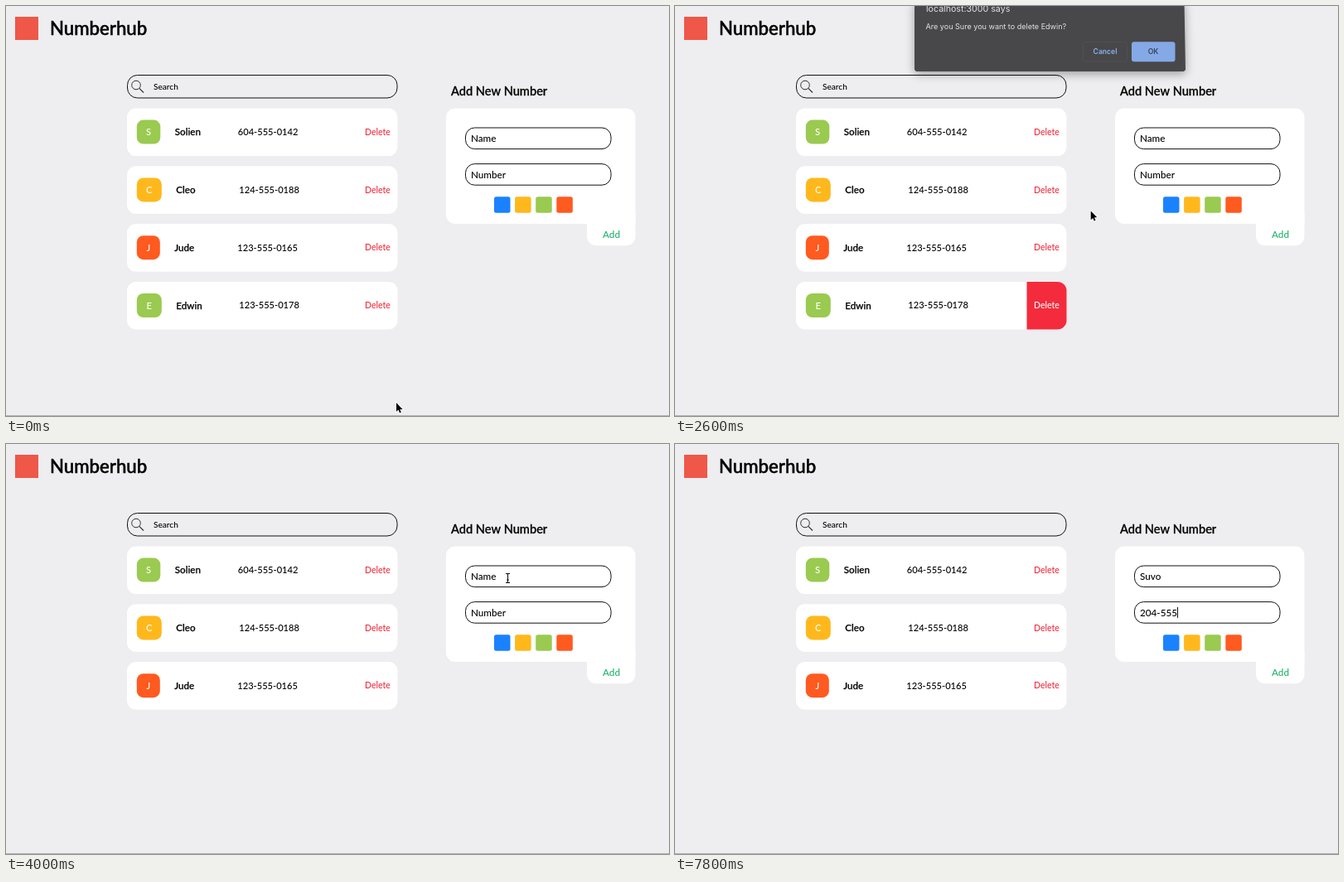
These frames come from a looping animation (800x495 px, 8000 ms). An HTML page with a canvas:

```html
<!DOCTYPE html>
<html lang="en">
<head>
<meta charset="utf-8">
<title>Numberhub</title>
<style>
  html, body { margin: 0; width: 100%; height: 100%; overflow: hidden; background: #eeedef; }
  canvas { display: block; }
</style>
</head>
<body>
<canvas id="stage" width="800" height="495"></canvas>
<script>
const ctx = document.getElementById('stage').getContext('2d');
const LOOP = 8000, STEP = 100;
const BLUE = '#1a82ff', YELLOW = '#ffb81c', GREEN = '#9aca50', ORANGE = '#ff5a1f';
const RED = [244, 43, 60], WHITE = [255, 255, 255];

const contacts = [
  { name: 'Solien', number: '604-555-0142', color: GREEN, badge: 28.5 },
  { name: 'Cleo', number: '124-555-0188', color: YELLOW, badge: 30 },
  { name: 'Jude', number: '123-555-0165', color: ORANGE, badge: 28 },
  { name: 'Edwin', number: '123-555-0178', color: GREEN, badge: 30 }
];

// Moments in ms
const HOVER = 1300, OPEN = 2200, CLOSE = 3150, REMOVE = 3400, FOCUS = 4300, TAB = 6000;
const nameKeys = { text: 'Suvo', times: [4600, 5100, 5500, 5700] };
const numberKeys = { text: '204-555', times: [6200, 6400, 6700, 7000, 7200, 7500, 7800] };

const cursorPath = [
  [400, 471, 479], [1250, 455, 378], [1900, 447, 371], [2300, 447, 371],
  [3000, 586, 57], [3200, 587, 56], [3400, 587, 56], [3950, 605, 162]
];

const clamp = v => Math.max(0, Math.min(1, v));
const progress = (t, start, length) => clamp((t - start) / length);
const ease = p => p * p * (3 - 2 * p);
const mix = (a, b, p) => `rgb(${a.map((v, i) => Math.round(v + (b[i] - v) * p))})`;

function box(x, y, w, h, radius, fill, stroke) {
  ctx.beginPath();
  ctx.roundRect(x, y, w, h, radius);
  if (fill) { ctx.fillStyle = fill; ctx.fill(); }
  if (stroke) { ctx.strokeStyle = stroke; ctx.lineWidth = 1; ctx.stroke(); }
}

// Text is placed by the middle of its capitals; bold adds a hairline outline.
function label(str, x, y, size, { color = '#000', align = 'left', bold = 0, font = '500 %px Lato, sans-serif' } = {}) {
  ctx.font = font.replace('%', size);
  ctx.textAlign = align;
  ctx.fillStyle = ctx.strokeStyle = color;
  ctx.fillText(str, x, y + size * 0.36);
  if (bold) {
    ctx.lineWidth = bold;
    ctx.strokeText(str, x, y + size * 0.36);
  }
  return ctx.measureText(str).width;
}

function shape(points, fill, stroke, width) {
  ctx.beginPath();
  points.forEach(([x, y]) => ctx.lineTo(x, y));
  ctx.closePath();
  if (stroke) { ctx.strokeStyle = stroke; ctx.lineWidth = width; ctx.stroke(); }
  ctx.fillStyle = fill;
  ctx.fill();
}

function line(x1, y1, x2, y2, color, width) {
  ctx.beginPath();
  ctx.moveTo(x1, y1);
  ctx.lineTo(x2, y2);
  ctx.strokeStyle = color;
  ctx.lineWidth = width;
  ctx.stroke();
}

function drawHeader() {
  box(11, 13, 28, 28, 0, '#ef5748');
  label('Numberhub', 53, 27, 22.2, { bold: 0.5 });
  box(146.5, 83.5, 325.5, 27.5, 12, null, '#111');
  ctx.beginPath();
  ctx.arc(157, 95.5, 5.3, 0, Math.PI * 2);
  ctx.strokeStyle = '#333';
  ctx.lineWidth = 1;
  ctx.stroke();
  line(160.8, 99.3, 166, 104.5, '#333', 1.2);
  label('Search', 178, 97, 10.1);
}

function drawContact({ name, number, color, badge }, index, hover) {
  const top = 123.5 + index * 69.8, mid = top + 28.6;
  const right = 157.8 + badge;
  box(146, top, 326.5, 57.6, 11, '#fff');
  if (hover) box(424.5, top, 48, 57.6, [0, 11, 11, 0], mix(WHITE, RED, hover));
  box(157.8, mid - 14.5, badge, 29, 8, color);
  label(name[0], 157.8 + badge / 2, mid, 11.2, { color: '#fff', align: 'center' });
  label(name, right + 17.5, mid, 11.6, { bold: 0.25 });
  label(number, right + 93.5, mid, 11.1);
  label('Delete', 433, mid, 10.5, { color: mix(RED, WHITE, hover) });
}

function drawField(t, placeholder, { text, times }, y, focusFrom, focusTo) {
  box(554.5, y - 12.8, 175.5, 25.6, 11, '#fff', '#111');
  const typed = text.slice(0, times.filter(time => t >= time).length);
  const width = label(typed || placeholder, 561, y, 11.7);
  if (t >= focusFrom && t < focusTo) {
    const x = 561.5 + (typed ? width : 0);
    line(x, y - 6.5, x, y + 6.5, '#111', 1);
  }
}

function drawForm(t) {
  label('Add New Number', 537, 102.5, 14.6, { bold: 0.3 });
  box(531, 123.5, 228.5, 139.5, [11, 11, 0, 11], '#fff');
  box(701, 250, 58.5, 39.3, [0, 0, 11, 11], '#fff');
  drawField(t, 'Name', nameKeys, 159.8, FOCUS, TAB);
  drawField(t, 'Number', numberKeys, 203.4, TAB, LOOP);
  [BLUE, YELLOW, GREEN, ORANGE].forEach((color, i) => box(589 + i * 25.1, 230.2, 19.5, 19.5, 2.5, color));
  label('Add', 720, 276, 11.7, { color: '#20b26b' });
}

function drawDialog(t) {
  const hidden = Math.max(1 - progress(t, OPEN - 100, 200), progress(t, CLOSE, 200));
  if (hidden >= 1) return;
  const inset = 8 * hidden;
  const font = weight => `${weight} %px Inter, sans-serif`;
  ctx.save();
  ctx.globalAlpha = 1 - hidden ** 3;
  ctx.shadowColor = 'rgba(0,0,0,.35)';
  ctx.shadowBlur = 12;
  ctx.shadowOffsetY = 3;
  shape([[289 + inset, -6], [614.5 - inset / 4, -6], [616, 77], [614, 79], [291, 79], [289, 77]], '#48484a');
  ctx.shadowColor = 'transparent';
  label('localhost:3000 says', 303, 3.5, 10.65, { color: '#e2e2e4', font: font(400) });
  label(`Are you Sure you want to delete ${contacts[3].name}?`, 302.5, 25, 9.05, { color: '#e2e2e4', font: font(400) });
  box(492.5, 43.5, 53, 23.5, 3, null, '#505052');
  label('Cancel', 519, 55.3, 8.6, { color: '#8cb2ee', align: 'center', font: font(600) });
  box(551, 43.3, 52.5, 24, 3, '#85a9e6');
  label('OK', 577, 55.3, 8.6, { color: '#36445e', align: 'center', font: font(600) });
  ctx.restore();
}

function cursorAt(t) {
  const next = cursorPath.findIndex(([time]) => time > t);
  if (next === 0) return cursorPath[0].slice(1);
  if (next < 0) return cursorPath.at(-1).slice(1);
  const [t0, x0, y0] = cursorPath[next - 1], [t1, x1, y1] = cursorPath[next];
  const p = ease((t - t0) / (t1 - t0));
  return [x0 + (x1 - x0) * p, y0 + (y1 - y0) * p];
}

function drawArrow() {
  shape([[0, 0], [0, 10.8], [2.5, 8.5], [4, 12.2], [5.8, 11.4], [4.3, 7.9], [7.6, 7.9]], '#000', '#fff', 1.6);
}

function drawHand() {
  ctx.lineJoin = 'round';
  shape([[-2, 0], [-0.4, -0.8], [1.2, 3.6], [3, 3], [4.3, 3.6], [5.6, 3.4], [6.6, 4.5],
    [6.5, 8], [5.4, 11], [0, 11], [-3.6, 6.8], [-2.8, 5.8], [-0.7, 7]], '#fff', '#111', 1.8);
  [1.8, 3.6].forEach(x => line(x, 6, x, 9, '#111', 0.7));
  ctx.lineJoin = 'miter';
}

function drawBeam() {
  line(0.5, -5, 0.5, 5, '#111', 1.1);
  [-5.5, 5.5].forEach(y => line(-2, y, 3, y, '#111', 1));
  line(-1, 2, 2, 2, '#111', 0.8);
}

function drawCursor(t) {
  if (t >= nameKeys.times[0]) return;
  ctx.save();
  ctx.translate(...cursorAt(t));
  if (t >= 3900) drawBeam();
  else if (t >= HOVER && t < 2000) drawHand();
  else drawArrow();
  ctx.restore();
}

function draw(t) {
  ctx.fillStyle = '#eeedef';
  ctx.fillRect(0, 0, 800, 495);
  ctx.fillStyle = '#b0afb1';
  ctx.fillRect(0, 494, 800, 1);
  drawHeader();
  const hover = progress(t, HOVER, 350);
  contacts.forEach((contact, i) => {
    if (i < 3 || t < REMOVE) drawContact(contact, i, i === 3 ? hover : 0);
  });
  drawForm(t);
  drawDialog(t);
  drawCursor(t);
}

function frame() {
  const t = performance.now() % LOOP;
  draw(Math.floor(t / STEP) * STEP);
  requestAnimationFrame(frame);
}
frame();
</script>
</body>
</html>
```
